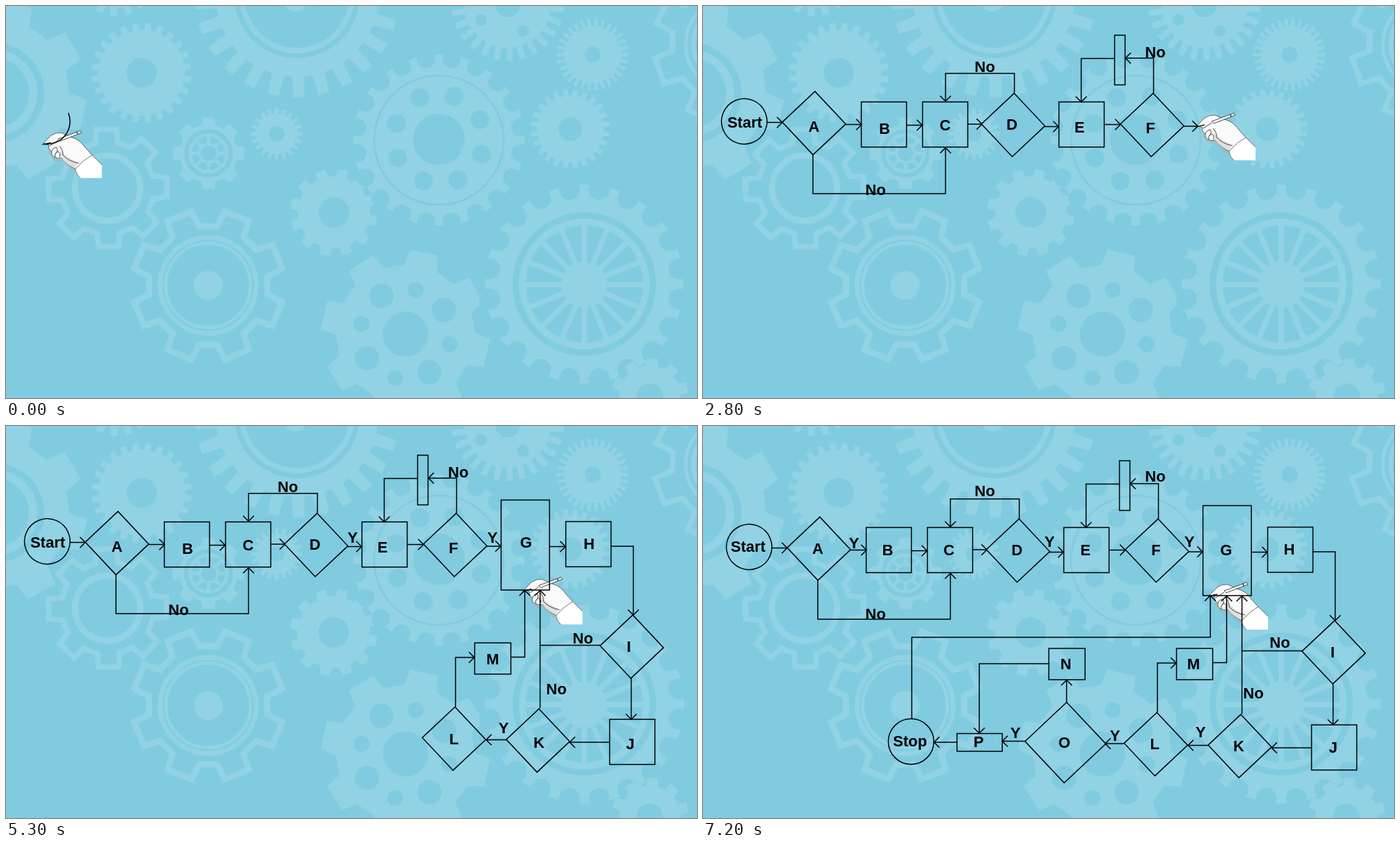
Recreate the animation shown at these times as an HTML page. Size 993x564 px, loop 7.3 s.

```html
<!DOCTYPE html>
<html lang="en">
<head>
<meta charset="utf-8">
<title>Flow chart being drawn</title>
<style>
  html, body { margin: 0; width: 100%; height: 100%; overflow: hidden; background: #80cbe0; }
  svg { display: block; width: 993px; height: 564px; }
  #chart path { fill: none; stroke: #000; stroke-width: 1.5; }
  #labels text { font: bold 22px "Liberation Sans", Arial, sans-serif; text-anchor: middle; }
  .pale { fill: #91d2e4; }
  .deep { fill: #80cbe0; }
  .pale-line { fill: none; stroke: #91d2e4; }
  .deep-line { fill: none; stroke: #80cbe0; }
</style>
</head>
<body>
<svg viewBox="0 0 993 564">
  <g id="gears"></g>
  <g id="hand">
    <path d="M6 6L5 14L12 25L24 27L40 41L45 38L24 18Z" fill="#a9afb1" opacity=".5"/>
    <path d="M-3 0L8 -11Q15 -16 23 -15Q30 -12 35 -9Q46 -7 53 1Q60 10 67 17L43 37Q34 33 23 21Q18 23 13 20Q8 18 9 12Q3 8 5 3Z" fill="#fafafa" stroke="#444" stroke-width=".8"/>
    <path d="M20 9Q32 22 46 27L43 36Q32 32 23 21Z" fill="#dfe0e1"/>
    <path d="M6 4Q12 0 18 -4M9 12Q10 7 16 6Q19 11 14 15M14 20Q12 15 18 12Q23 15 20 20M20 4Q26 11 25 17M25 17Q33 26 48 29" fill="none" stroke="#333" stroke-width=".9"/>
    <path d="M67 17L81 31V50H50Q43 44 43 37Q54 24 67 17Z" fill="#fff"/>
    <path d="M81 31L67 17Q54 24 43 37Q44 45 50 50" fill="none" stroke="#555" stroke-width=".8"/>
    <path d="M18 -6L50 -18L52 -15L21 -3Z" fill="#fff" stroke="#333" stroke-width=".9"/>
    <path d="M45 -16L46 -13M-5 2L8 -1" fill="none" stroke="#222" stroke-width="1.3"/>
  </g>
  <g id="chart"></g>
  <g id="labels"></g>
</svg>
<script>
const LOOP = 7300, TICK = 100, LAST = 72;
const TAU = Math.PI * 2;
const $ = id => document.getElementById(id);
const gears = $("gears"), hand = $("hand"), chart = $("chart"), labels = $("labels");

function add(parent, tag, attrs) {
  const el = document.createElementNS("http://www.w3.org/2000/svg", tag);
  for (const k in attrs) el.setAttribute(k, attrs[k]);
  return parent.appendChild(el);
}
const polar = (x, y, r, a) => [x + r * Math.cos(a), y + r * Math.sin(a)];
const line = pts => "M" + pts.map(p => p.map(v => v.toFixed(1)).join(" ")).join("L");

// ---- background gears ----
const disc = (cls, cx, cy, r) => add(gears, "circle", { class: cls, cx, cy, r });
const hole = (x, y, r) => disc("deep", x, y, r);
const ring = (cls, x, y, r, w) => disc(cls + "-line", x, y, r).setAttribute("stroke-width", w);
const trace = (d, w) => add(gears, "path", { class: "pale-line", d, "stroke-width": w });

function around(x, y, r, n, turn, make) {
  for (let i = 0; i < n; i++) make(...polar(x, y, r, turn * Math.PI / 180 + i * TAU / n), i);
}
// base and top: half widths of a tooth as a share of half its pitch
function teeth(x, y, root, tip, n, turn, base = .62, top = .43) {
  const pts = [], h = Math.PI / n;
  for (let i = 0; i < n; i++) {
    const a = turn * Math.PI / 180 + i * TAU / n;
    pts.push(polar(x, y, root, a - base * h), polar(x, y, tip, a - top * h),
             polar(x, y, tip, a + top * h), polar(x, y, root, a + base * h));
  }
  return line(pts) + "Z";
}
function gear(x, y, root, tip, n, turn, bore) {
  add(gears, "path", { class: "pale", d: teeth(x, y, root, tip, n, turn) });
  hole(x, y, bore);
}
function scalloped(x, y, r, n, bite) {
  disc("pale", x, y, r);
  around(x, y, r - bite * .35, n, 180 / n, (px, py) => hole(px, py, bite));
}
const spokes = (x, y, r, n, w) =>
  around(x, y, r, n, 0, (px, py) => trace(`M${x} ${y}L${px} ${py}`, w));

gear(-17, 125, 108, 134, 8, 14, 72);
ring("pale", -17, 125, 56, 12);
gear(160, -42, 44, 57, 16, 5, 10);
gear(195, 96, 62, 72, 24, 7.5, 21.5);
gear(418, -15, 117, 147, 25, 89, 90);
ring("pale", 418, -15, 79, 8);
disc("pale", 416, -10, 18);
gear(721, -2, 62, 81, 26, 88, 18);
around(721, -2, 44, 4, 60, (x, y) => hole(x, y, 8.5));
gear(843, 70, 41, 52, 30, 0, 11.5);
gear(811, 177, 48, 57, 24, 7.5, 17);
trace(teeth(1045, 55, 88, 114, 8, 160), 8);
ring("pale", 1045, 55, 68, 5);
ring("pale", 1045, 55, 57, 6);
trace(teeth(146, 262, 67, 86, 8, -91), 8);
ring("pale", 146, 262, 47, 9);
gear(291, 212, 42, 52, 8, -90, 35);
ring("pale", 291, 212, 26.5, 5);
spokes(291, 212, 27, 8, 5);
disc("pale", 291, 212, 15);
hole(291, 212, 11);
gear(389, 184, 29, 37, 20, 0, 11);
trace(teeth(290.5, 402, 86, 109, 8, 22.5), 9);
ring("pale", 290.5, 402, 69, 7);
ring("pale", 290.5, 402, 61, 5);
disc("pale", 290.5, 402, 21);
gear(471, 297, 52, 63, 12, -78, 22);
scalloped(622, 193, 123, 20, 13);
ring("deep", 622, 193, 93, 2.5);
hole(622, 192, 37);
around(622, 191, 65, 8, -70, (x, y) => hole(x, y, 13.5));
gear(574, 472, 100, 122, 8, -77, 32.5);
around(574, 472, 65, 8, -77, (x, y, i) => hole(x, y, i % 2 ? 17.5 : 11.5));
scalloped(831, 400, 143, 20, 15);
ring("deep", 831, 400, 98.5, 9);
hole(831, 400, 84);
spokes(831, 401, 86, 16, 8);
disc("pale", 831, 401, 33);
gear(925, 562, 45, 56, 10, -86, 19);

// ---- chart ----
const strokes = [], words = [], beatsUsed = new Set();

// a stroke that is finished at the given tick, after growing for some beats
function draw(d, tick, beats = 1, end = "") {
  const el = add(chart, "path", { d, pathLength: 1 });
  const first = tick - beats + 1;
  strokes.push({ el, first, beats, size: el.getTotalLength(), head: end && add(chart, "path", { d: end }) });
  for (let t = first; t <= tick; t++) beatsUsed.add(t);
}
function arrow(tick, pts, beats) {
  const [x, y] = pts.at(-1), [px, py] = pts.at(-2);
  const back = Math.atan2(py - y, px - x);
  const barb = side => polar(x, y, 11, back + side * TAU / 8);
  draw(line(pts), tick, beats, line([barb(-1), [x, y], barb(1)]));
}
function label(text, tick, place) {
  const el = add(labels, "text", {});
  el.textContent = text;
  words.push({ el, tick, place });
}
// text beside an arrow
const note = (text, tick, x, y) => label(text, tick, t => [x, t < LAST ? y : y + 6]);

// text in a shape: centred at first and at the end, a little off between
function node(text, d, x, y, tick, { beats, wait = 1, off = [0, 0] } = {}) {
  draw(d, tick, beats);
  label(text, tick + wait, t =>
    t >= LAST ? [x + 5.5, y + 7] : t < 8 ? [x, y] : [x + off[0], y + off[1]]);
}
// outlines start at a side: 0 right, 1 bottom, 2 left, 3 top
function diamond(text, x, y, tick, opt = {}) {
  const { r = 45.6, side = 3 } = opt;
  const pts = [0, 1, 2, 3].map(k => polar(x, y, r, (side + k) * TAU / 4 + .031));
  node(text, line(pts) + "Z", x, y, tick, opt);
}
function box(text, x, y, tick, opt = {}) {
  const { w = 65, h = 65, side = 0 } = opt;
  const at = (a, s = 1) => [x + Math.round(Math.cos(a) * s) * w / 2, y + Math.round(Math.sin(a) * s) * h / 2];
  const corners = [0, 1, 2, 3].map(k => at((side + k + .5) * TAU / 4, 1.4));
  node(text, line([at(side * TAU / 4), ...corners]) + "Z", x, y, tick, opt);
}
function circle(text, x, y, tick, turn, opt) {
  const r = 32.7, a = turn * TAU / 360;
  const p = polar(x, y, r, a), q = polar(x, y, r, a + Math.PI);
  node(text, `M${p}A${r} ${r} 0 0 1 ${q}A${r} ${r} 0 0 1 ${p}Z`, x, y, tick, opt);
}

circle("Start", 59.3, 166, 2, -22, { beats: 3, off: [.7, .5] });
arrow(3, [[92, 167.5], [114, 167.5]]);
diamond("A", 159.5, 168.5, 4, { side: 0, off: [0, 4] });
arrow(5, [[205, 170.5], [228, 170.5]]);
box("B", 260, 170.5, 6, { off: [1, 5.5] });
arrow(7, [[293, 171.5], [315, 171.5]]);
arrow(9, [[158, 214], [158, 270], [348.5, 270], [348.5, 204]], 2);
note("No", 10, 248, 264);
box("C", 348, 170.5, 10, { side: 2 });
arrow(11, [[381, 170], [401, 170]]);
diamond("D", 445.7, 171.2, 13, { off: [-1.7, -1] });
arrow(15, [[447.5, 125], [447.5, 97], [348.5, 97], [348.5, 137]]);
note("No", 17, 405, 87);
arrow(19, [[491, 173.5], [511, 173.5]], 3);
box("E", 544, 170.5, 20, { off: [-3, 3] });
arrow(22, [[577, 170.5], [600, 170.5]]);
diamond("F", 645.5, 171.2, 23, { off: [-2.5, 3.5] });
arrow(25, [[647.5, 125], [647.5, 75], [607, 75]]);
box("", 599, 77.8, 26, { w: 15, h: 71.5, side: 2 });
arrow(26, [[591, 75.5], [543.5, 75.5], [543.5, 138]]);
arrow(28, [[691, 173], [711, 173]]);
note("No", 28, 650, 66);
box("G", 746.2, 171.2, 30, { w: 69.5, h: 129.5, beats: 2, off: [1, -4.5] });
arrow(32, [[781, 173.5], [804, 173.5]]);
box("H", 837, 170, 33, { off: [1, -1] });
arrow(35, [[870, 173], [901.5, 173], [901.5, 272]]);
diamond("I", 899.3, 317.5, 37, { side: 1, beats: 2, wait: 0, off: [-4.3, -1] });
arrow(39, [[898.5, 363], [898.5, 422]]);
box("J", 900, 454.5, 40, { side: 2, off: [-3, 2] });
arrow(42, [[867, 455], [810, 455]]);
diamond("K", 764.5, 452.5, 43, { off: [1.5, 2.5] });
draw("M854 315.5H767.5", 45);
arrow(45, [[767.5, 406], [767.5, 236.5]]);
note("No", 45, 829, 305);
note("No", 45, 791, 378);
note("Y", 45, 498, 160);
note("Y", 45, 699, 160);
arrow(47, [[719, 451.5], [690, 451.5]]);
note("Y", 47, 715, 434);
diamond("L", 643.8, 449.8, 49);
arrow(51, [[646, 404], [646, 333], [673, 333]]);
box("M", 699.5, 334.5, 52, { w: 52, h: 45 });
arrow(53, [[725, 332.5], [745.5, 332.5], [745.5, 236.5]]);
arrow(55, [[598, 449], [571, 449]]);
note("Y", 55, 592, 439);
diamond("O", 513.8, 447.5, 56, { r: 58, side: 2, off: [-3.8, -5] });
arrow(57, [[456, 445.5], [423, 445.5]]);
arrow(59, [[515.5, 390], [515.5, 357.5]]);
note("Y", 59, 217, 162);
box("N", 516, 334.5, 61, { w: 52, h: 45, side: 2, beats: 2, wait: 0, off: [-5, 3.5] });
arrow(63, [[490, 334], [390, 334], [390, 434]]);
box("P", 390.5, 447.2, 65, { w: 65, h: 25.5, side: 2, beats: 2 });
arrow(67, [[358, 447], [325, 447]]);
circle("Stop", 292, 446, 68, -90);
note("Y", 70, 449, 435);
arrow(72, [[293, 413], [293, 296], [722, 296], [722, 236]], 3);

// ---- playback ----
const show = (el, on) => el.setAttribute("visibility", on ? "visible" : "hidden");

function render(tick) {
  while (!beatsUsed.has(tick)) tick--;
  const shift = tick < LAST ? [0, 0] : [7, 8];
  chart.setAttribute("transform", `translate(${shift})`);
  for (const { el, first, beats, size, head } of strokes) {
    const part = Math.min(1, (tick - first + 1) / beats);
    show(el, part > 0);
    if (head) show(head, part === 1);
    if (part <= 0) continue;
    el.setAttribute("stroke-dasharray", part < 1 ? `${part} 2` : "none");
    const p = el.getPointAtLength(part * size);
    hand.setAttribute("transform", `translate(${p.x + shift[0] + 2} ${p.y + shift[1] - 1})`);
  }
  for (const { el, tick: from, place } of words) {
    const [x, y] = place(tick);
    show(el, tick >= from);
    el.setAttribute("x", x);
    el.setAttribute("y", y + 8);
  }
}

let shown = 0;
const start = performance.now();
render(0);
function loop() {
  const tick = Math.floor((performance.now() - start) % LOOP / TICK);
  if (tick !== shown) render(shown = tick);
  requestAnimationFrame(loop);
}
requestAnimationFrame(loop);
</script>
</body>
</html>
```
